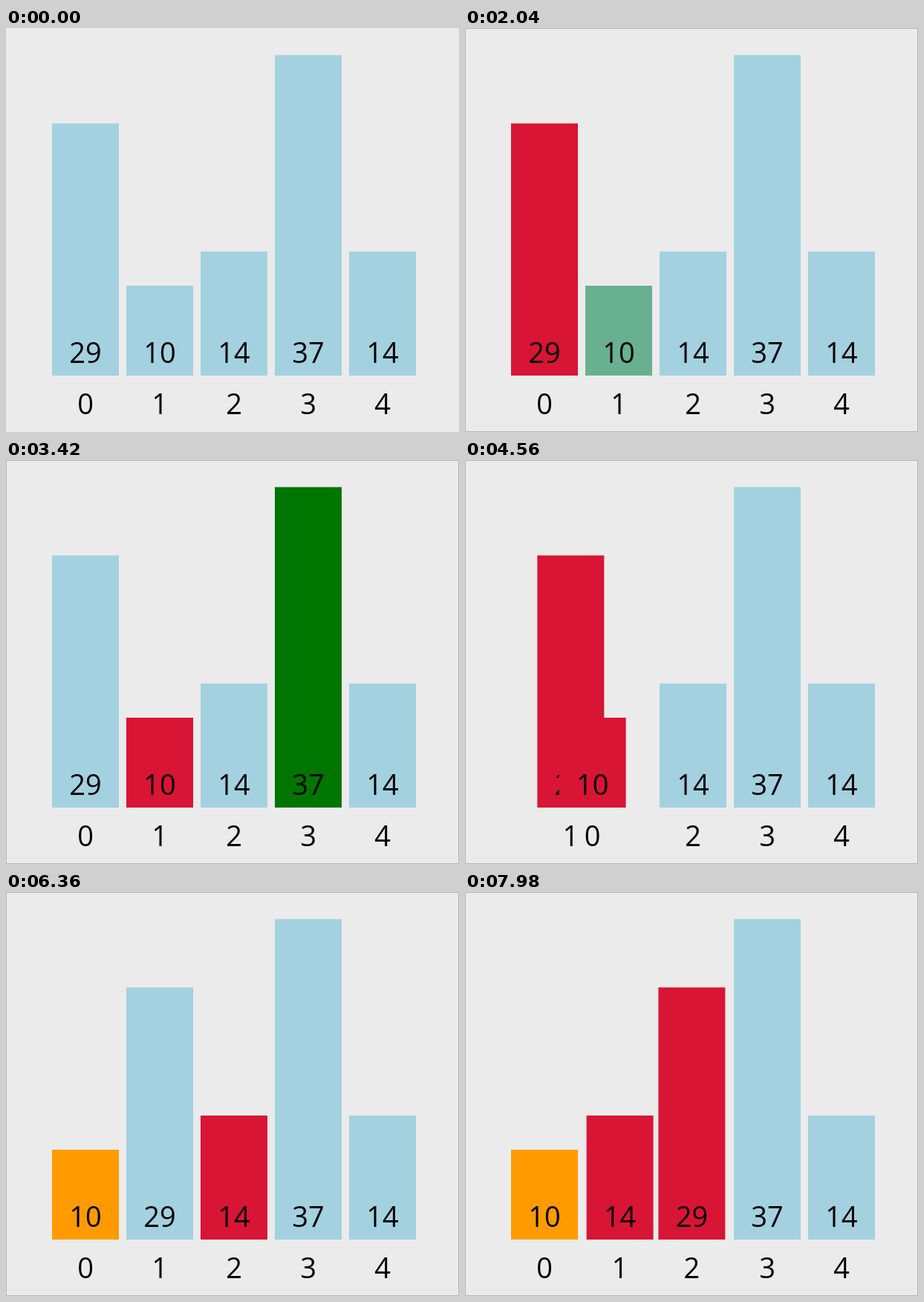
Animation of 610 by 544 pixels, one loop 8000 ms. Source, as an HTML page:

```html
<!DOCTYPE html>
<html lang="en">
<head>
<meta charset="utf-8">
<title>Selection sort</title>
<style>
  html, body { margin: 0; width: 100%; height: 100%; overflow: hidden; background: #ebebeb; }
  svg { display: block; width: 610px; height: 544px; }
  text { font: 38px "Open Sans", "Noto Sans", sans-serif; text-anchor: middle; }
</style>
</head>
<body>
<svg viewBox="0 0 610 544">
  <rect width="610" height="544" fill="#ebebeb"/>
  <g id="bars"></g>
  <rect id="border" x=".5" y=".5" width="609" height="543" fill="none" stroke="#b4b4b4"/>
</svg>
<script>
const LOOP = 8000, FADE = 220, BORDER_AT = 360, BASE = 468;
const VALUES = [29, 10, 14, 37, 14];
const COLORS = {
  b: [163, 209, 224], // idle
  r: [216, 21, 52],   // current minimum or swapping
  g: [0, 117, 0],     // being compared
  o: [255, 155, 0]    // sorted
};

// [start time, colour of each bar, slot of each bar]
const STEPS = [
  [-1000, 'bbbbb', '01234'],
  [1475, 'rbbbb', '01234'],
  [1943, 'rgbbb', '01234'],
  [2370, 'brbbb', '01234'],
  [2790, 'brgbb', '01234'],
  [3205, 'brbgb', '01234'],
  [3640, 'brbbg', '01234'],
  [4060, 'rrbbb', '01234'],
  [4463, 'rrbbb', '10234'],
  [4905, 'bobbb', '10234'],
  [5270, 'robbb', '10234'],
  [5713, 'rogbb', '10234'],
  [6125, 'borbb', '10234'],
  [6575, 'borgb', '10234'],
  [6990, 'borbg', '10234'],
  [7400, 'rorbb', '10234'],
  [7796, 'rorbb', '20134']
];

function add(parent, tag, attrs) {
  const el = document.createElementNS('http://www.w3.org/2000/svg', tag);
  for (const key in attrs) el.setAttribute(key, attrs[key]);
  return parent.appendChild(el);
}

const border = document.getElementById('border');
const bars = VALUES.map(value => {
  const group = add(document.getElementById('bars'), 'g', {});
  const height = 11.5 * value + 6;
  const rect = add(group, 'rect', { x: 0, y: BASE - height, width: 90, height });
  add(group, 'text', { x: 45, y: 450.5 }).textContent = value;
  const label = add(group, 'text', { x: 45, y: 519.5 });
  return { group, rect, label };
});

const ease = x => x < 0.5 ? 4 * x ** 3 : 1 - (2 - 2 * x) ** 3 / 2;
const mix = (a, b, k) => a + (b - a) * k;

function draw(t) {
  let n = STEPS.length - 1;
  while (STEPS[n][0] > t) n--;
  const [start, colors, slots] = STEPS[n];
  const [, oldColors, oldSlots] = STEPS[Math.max(n - 1, 0)];
  const k = ease(Math.min((t - start) / FADE, 1));

  bars.forEach(({ group, rect, label }, i) => {
    const x = 62 + 100 * mix(+oldSlots[i], +slots[i], k);
    const from = COLORS[oldColors[i]], to = COLORS[colors[i]];
    const rgb = from.map((c, j) => Math.round(mix(c, to[j], k)));
    group.setAttribute('transform', `translate(${x} 0)`);
    rect.setAttribute('fill', `rgb(${rgb})`);
    label.textContent = slots[i];
  });
  border.style.display = t < BORDER_AT ? 'none' : '';
}

const origin = performance.now();
function tick() {
  draw((performance.now() - origin) % LOOP);
  requestAnimationFrame(tick);
}
tick();
</script>
</body>
</html>
```
